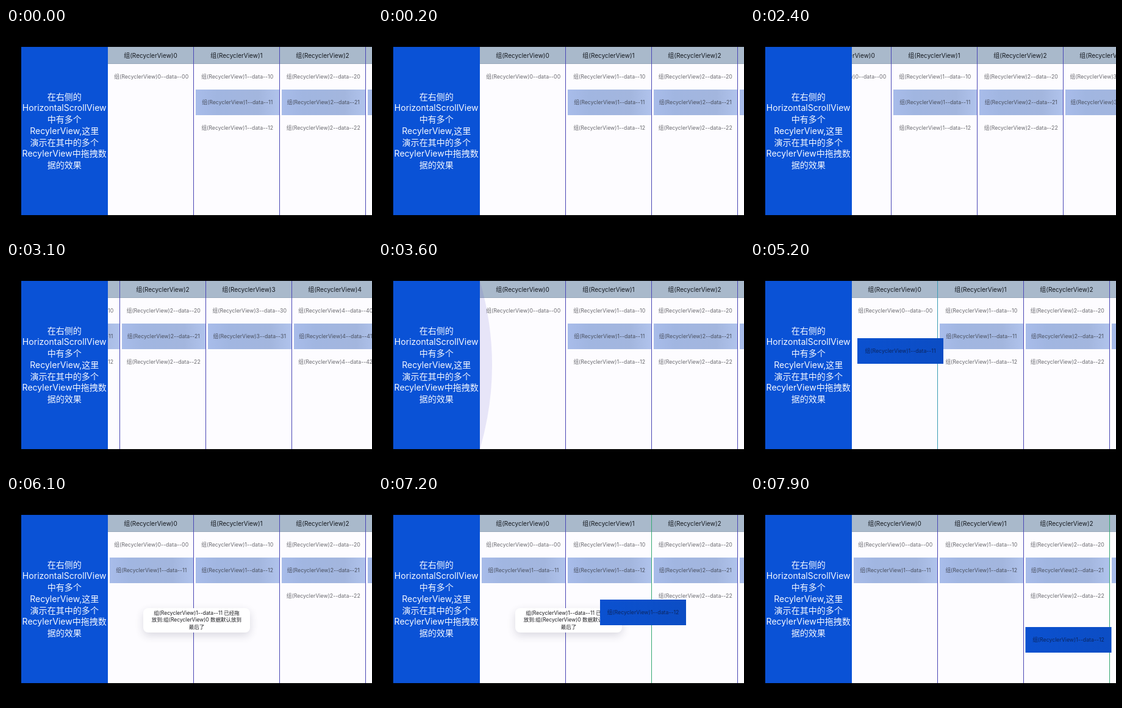
These frames come from a looping animation (600 by 338 pixels, 8000 ms). An HTML page:

```html
<!DOCTYPE html>
<html lang="zh-CN">
<head>
<meta charset="utf-8">
<style>
html, body { margin: 0; width: 100%; height: 100%; overflow: hidden; background: #000; }
#stage {
  position: relative; width: 600px; height: 338px; overflow: hidden; background: #000;
  font-family: Inter, "Noto Sans CJK SC", "Noto Sans CJK JP", "Noto Sans CJK", sans-serif;
  font-feature-settings: "calt" 0; white-space: nowrap; text-align: center;
}
#stage div { position: absolute; box-sizing: border-box; }
#side {
  left: 25px; top: 30.5px; width: 141.5px; height: 276.5px; background: #0a52d6;
  color: #f4f8ff; font-size: 14.05px; line-height: 18.75px; padding-top: 73px;
}
#side span { display: block; margin: 0 -10px; }
#view { left: 166.5px; top: 30.5px; width: 433.5px; height: 276.5px; overflow: hidden; background: #fdfcff; }
#strip { left: 0; top: 0; height: 100%; width: 705px; }
.col { top: 0; width: 141px; height: 100%; }
.head {
  left: 0; top: 0; width: 100%; height: 28.5px; line-height: 29px; font-size: 10px;
  color: #15191f; background: #a9b9cb; border-bottom: 1px solid #98a8bb;
}
.line { right: -.4px; top: 0; width: 1.3px; height: 100%; background: #4a47b5; }
.cell { left: 3px; width: 137.5px; height: 42.3px; line-height: 42.3px; font-size: 8.75px; color: #6b6b70; }
.band { background: linear-gradient(90deg, #a8bcea, #a1b6e1 25%, #a3b6de 75%, #b0c3ec); color: #4b5160; }
#glow { position: absolute; left: 0; top: 0; }
#drag {
  left: 0; top: 0; width: 141px; height: 42.3px; line-height: 42.3px; font-size: 8.75px;
  background: linear-gradient(90deg, #0b51d0, #0c4dc4); color: #0c2660;
}
#toast {
  left: 225px; top: 183.5px; width: 175px; height: 40.5px; border-radius: 8px; background: #fff;
  box-shadow: 0 5px 14px rgba(40, 40, 70, .16); color: #1c1c20;
  font-size: 8.5px; line-height: 11.2px; padding-top: 3.6px;
}
</style>
</head>
<body>
<div id="stage">
  <div id="view">
    <div id="strip"></div>
    <svg id="glow" width="40" height="277"><path d="M0 0Q40 138 0 276.5Z" fill="#5a46c8" fill-opacity=".13"/></svg>
  </div>
  <div id="side"><span>在右侧的</span><span>HorizontalScrollView</span><span>中有多个</span><span>RecylerView,这里</span><span>演示在其中的多个</span><span>RecylerView中拖拽数</span><span>据的效果</span></div>
  <div id="toast">组(RecyclerView)1--data--11 已经拖<br>放到:组(RecyclerView)0 数据默认放到<br>最后了</div>
  <div id="drag"></div>
</div>
<script>
const LOOP = 8000, STEP = 100, DROP = 5300;
const COL = 141, ROW = 42.3, LEFT = 166.5;
const $ = id => document.getElementById(id);
const name = (g, i) => `组(RecyclerView)${g}--data--${g}${i}`;

function add(parent, cls, text = '') {
  const el = document.createElement('div');
  el.className = cls;
  el.textContent = text;
  parent.appendChild(el);
  return el;
}

function addCell(col, row, text) {
  const el = add(col, row === 1 ? 'cell band' : 'cell', text);
  el.style.top = 28.3 + row * ROW + 'px';
  return el;
}

const lines = [], before = [], after = [];
const counts = [1, 3, 3, 2, 3];
const cols = counts.map((n, g) => {
  const col = add($('strip'), 'col');
  col.style.left = g * COL + 'px';
  add(col, 'head', '组(RecyclerView)' + g);
  for (let i = 0; i < n; i++) {
    const cell = addCell(col, i, name(g, i));
    if (g === 1 && i > 0) before.push(cell);
  }
  lines.push(add(col, 'line'));
  return col;
});
after.push(addCell(cols[0], 1, name(1, 1)), addCell(cols[1], 1, name(1, 2)));

// Rows of [time, value, ...]
const scroll = [[2300, 0], [2400, 76], [2500, 160], [2600, 215], [2700, 245], [2900, 266],
  [3000, 268], [3100, 262], [3200, 220], [3300, 140], [3400, 55], [3500, 0]];
const glow = [[3400, 0], [3500, 1], [3600, 1], [4000, 0]];
const toast = [[5300, 0], [5400, .35], [5600, 1], [7300, 1], [7500, 0]];
const drags = [
  { from: 4500, to: DROP, item: 1,
    path: [[4500, 318, 109], [4700, 312, 110], [4900, 255, 117], [5100, 186, 124], [5200, 176, 125]] },
  { from: 6800, to: LOOP, item: 2,
    path: [[6800, 318, 109], [7000, 322, 118], [7200, 364, 170], [7400, 420, 236],
      [7600, 439, 257], [7700, 444, 245], [7800, 448, 229], [7900, 451.5, 215]] }
];

function at(table, t, k = 1) {
  if (t <= table[0][0]) return table[0][k];
  for (let i = 1; i < table.length; i++) {
    const a = table[i - 1], b = table[i];
    if (t <= b[0]) return a[k] + (b[k] - a[k]) * (t - a[0]) / (b[0] - a[0]);
  }
  return table[table.length - 1][k];
}

function draw(t) {
  $('strip').style.transform = `translateX(${-at(scroll, t)}px)`;
  $('glow').style.opacity = at(glow, t);
  $('toast').style.opacity = at(toast, t);
  before.forEach(el => el.hidden = t >= DROP);
  after.forEach(el => el.hidden = t < DROP);

  const d = drags.find(d => t >= d.from && t < d.to);
  let over = -1;
  $('drag').hidden = !d;
  if (d) {
    const x = at(d.path, t), y = at(d.path, t, 2);
    $('drag').textContent = name(1, d.item);
    $('drag').style.transform = `translate(${x}px, ${y}px)`;
    over = Math.floor((x + COL / 2 - LEFT) / COL);
  }
  lines.forEach((el, i) => {
    el.style.background = i !== over ? '' : d.item === 1 ? '#3a9cb4' : '#35a873';
  });
}

const start = performance.now();
function tick() {
  const t = (performance.now() - start) % LOOP;
  draw(Math.floor(t / STEP) * STEP);
  requestAnimationFrame(tick);
}
tick();
</script>
</body>
</html>
```
